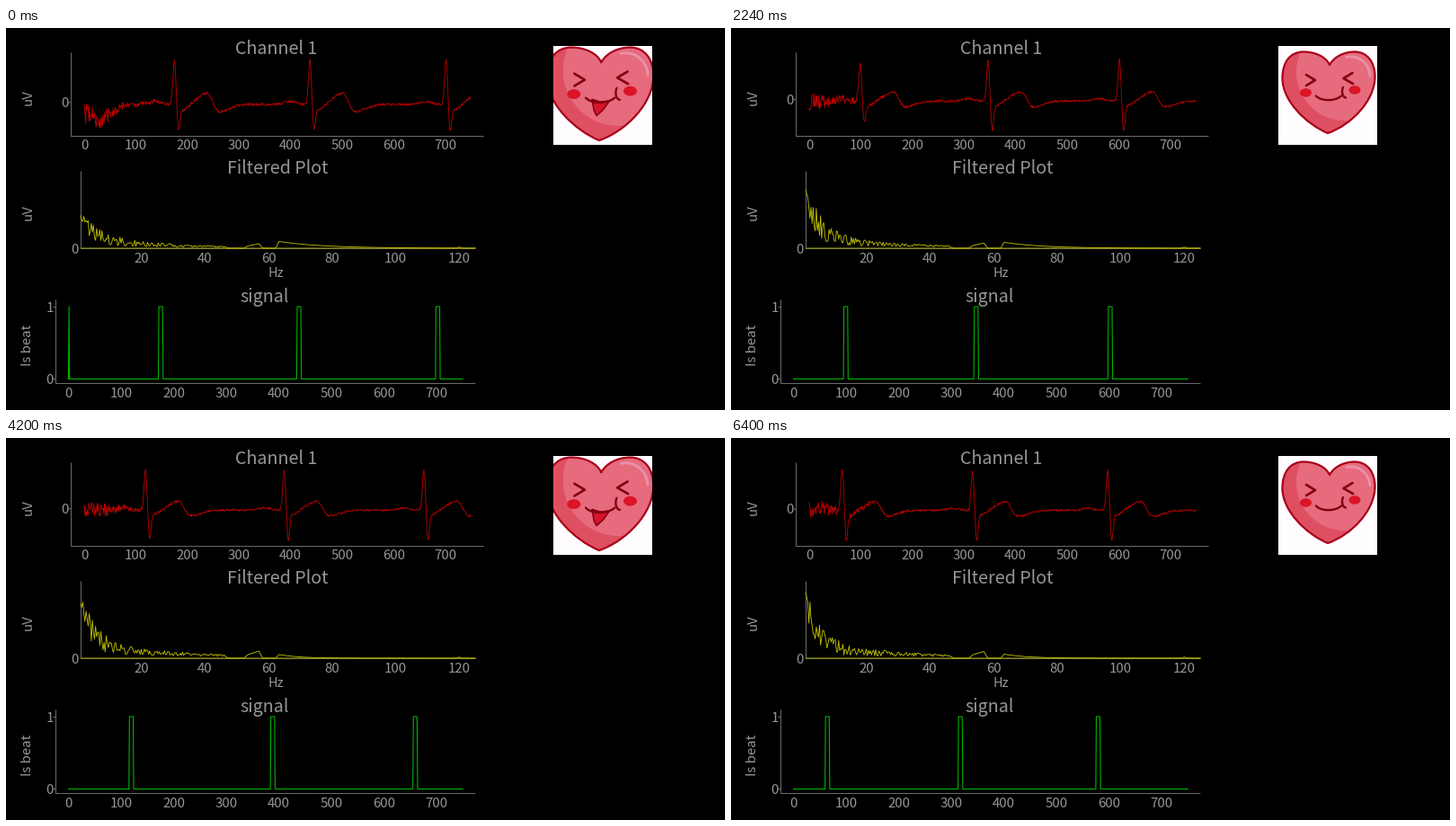
A matplotlib script for the animation above (6.44 s loop, 800 by 425 pixels).

```python
import numpy as np
import matplotlib.pyplot as plt
from matplotlib.animation import FuncAnimation
from matplotlib.patches import Circle, Ellipse, PathPatch, Polygon
from matplotlib.path import Path
from matplotlib.transforms import Affine2D

W, H, DPI = 800, 425, 100
STEP, FRAMES = 40, 161
PX = 72 / DPI  # points per pixel
GREY, AXIS = "#969696", "#6a6a6a"
plt.rcParams["font.family"] = "Noto Sans CJK JP"

rng = np.random.default_rng(7)
fig = plt.figure(figsize=(W / DPI, H / DPI), dpi=DPI, facecolor="black")
ax = fig.add_axes([0, 0, 1, 1])
ax.set(xlim=(0, W), ylim=(H, 0))
ax.axis("off")


def baseline(y, size=15):
    return y + 0.367 * size


def label(x, y, s, size=15, ha="center"):
    return ax.text(x, baseline(y, size), s, size=size * PX, color=GREY,
                   ha=ha, va="baseline")


def side_label(y, s):
    ax.text(24.5, y, s, size=15 * PX, color=GREY, rotation=90,
            ha="center", va="center")


def line(xs, ys, color=AXIS, w=1.0):
    return ax.plot(xs, ys, color=color, lw=w * PX, snap=False)[0]


def plot_frame(left, top, right, bottom):
    line([left, left, right], [top, bottom, bottom])


def x_labels(x0, per_unit, values, y):
    for v in values:
        label(x0 + per_unit * v, y, str(v))


# Static plot furniture
label(301, 22, "Channel 1", 19.7)
label(302.5, 155, "Filtered Plot", 19.7)
label(288, 298, "signal", 19.7)
label(300, 271.5, "Hz", 14.5)
side_label(77, "uV")
side_label(205, "uV")
side_label(353, "Is beat")
plot_frame(72.5, 28, 531, 120.5)
plot_frame(83.5, 160, 522, 245.5)
plot_frame(55.5, 303, 522, 395.5)
x_labels(87, 0.5736, range(0, 800, 100), 129.5)
x_labels(79.6, 3.54, range(20, 140, 20), 255)
x_labels(69.5, 0.585, range(0, 800, 100), 405.5)
label(80.5, 245.5, "0", ha="right")
for y, s in ((310.5, "1"), (390.5, "0")):
    label(53, y, s, ha="right")
    line([53, 55.5], [y, y])

# Recording: window start over time, and beat positions, both in samples
KEY_T = [0, 1240, 2240, 3480, 4200, 5440, 6400]
KEY_START = [0, 362, 603, 904, 1086, 1446, 1681]
BEATS = np.array([-88, 175, 438, 702, 950, 1205, 1474, 1745, 1998, 2260])
GROWTH = 0.5 + 0.5 * np.tanh((BEATS - 830) / 100)  # later beats are stronger
R_AMP = 46 + 6 * GROWTH
S_AMP = 30 + 13 * GROWTH
HISS = rng.uniform(-2.2, 2.2, 2600)
N = np.arange(751)


def bump(x, centre, left, right):
    d = x - centre
    return np.exp(-0.5 * (d / np.where(d < 0, left, right)) ** 2)


def ecg(start, settling, i):
    n = start + N
    v = HISS[n] * (0.6 + 0.4 * np.exp(-N / 250)) - 2
    for b, r, s in zip(BEATS, R_AMP, S_AMP):
        d = n - b
        boost = 1 + 0.15 * bump(b - start, 25, 8, 8)
        v += (r + 2) * boost * bump(d, 0, 2.9, 2.7)
        v -= (s - 5) * boost * bump(d, 8, 2.6, 2.6)
        v -= 6 * bump(d, 17, 7, 9)
        v += 3 * bump(d, -38, 12, 10)
        v += 12 * bump(d, 64, 17, 9)
        v -= 8 * bump(d, 86, 8, 20)
    # filter ringing at the left edge of the window
    ring = np.random.default_rng(100 + i).uniform(-1, 1, N.size)
    v += ring * 11 * np.exp(-(N / 75) ** 1.5)
    return v - 15 * settling * bump(N, 25, 10, 26)


def pulses(start, settling):
    n = start + N
    offset = n[:, None] - BEATS
    beat = ((offset >= -3) & (offset <= 4)).any(axis=1).astype(float)
    if settling > 0.7:
        beat[1] = 1
    return beat


# Spectrum: slowly changing roughness on a falling envelope
HZ = np.arange(1, 125.1, 1 / 3)
ROUGH = rng.uniform(-1, 1, (FRAMES // 8 + 3, HZ.size))
DEPTH = 0.95 * (1 - np.exp(-HZ / 6)) * np.exp(-HZ / 55)


def spectrum(t, i):
    k, u = divmod(i / 8, 1)
    rough = (1 - u) * ROUGH[int(k)] + u * ROUGH[int(k) + 1]
    sway = 0.5 - 0.5 * np.cos(2 * np.pi * t / 2700)
    low = 54 - 30 * np.exp(-t / 1300)
    v = low * np.exp(-(HZ - 1) / 4) + 11 * np.exp(-HZ / (24 + 14 * sway))
    v *= (1 + DEPTH * rough) * np.clip((47.5 - HZ) / 1.5, 0, 1)
    v += (5 + 3 * sway) * np.interp(HZ, [52.3, 53.5, 57, 58.2], [0, 0.5, 1, 0])
    tail = np.exp(-np.maximum(HZ - 63.3, 0) / (14 - 8 * sway))
    v += (7.5 - 3.5 * sway) * tail * np.clip(HZ - 62.3, 0, 1)
    return v + 1.2 * bump(HZ, 120, 0.4, 0.4)


zero = label(70, 83, "0", ha="right")
zero_tick = line([70, 72.5], [83, 83])
thousand = label(70, 31, "1000", ha="right")
thousand_tick = line([70, 72.5], [31, 31])
red = line([], [], "#bc0000", 0.85)
line([83.5, 522], [245, 245], "#a0a000")
yellow = line([], [], "#c4c400", 0.85)
green = line([], [], "#00b400", 1.1)

# Heart picture
hax = fig.add_axes([609 / W, 1 - 130 / H, 110 / W, 110 / H])
hax.set(xlim=(609, 719), ylim=(130, 20), xticks=[], yticks=[],
        facecolor="#fffcff")
hax.spines[:].set_visible(False)
DARK = "#860010"


def curve(*pts):
    return Path(pts, [Path.MOVETO] + [Path.CURVE4] * (len(pts) - 1))


OUTLINE = curve((666, 41), (662, 32), (650, 26.5), (637, 26.5),
                (622, 26.5), (613.5, 38), (613.5, 56),
                (613.5, 81), (640, 107), (664, 117),
                (690, 108), (716.5, 81), (716.5, 54),
                (716.5, 38), (708, 26.5), (694, 26.5),
                (682, 26.5), (671, 32), (666, 41))


def heart(tr, laughing):
    parts = []

    def add(patch, clip=None):
        patch.set_transform(tr + hax.transData)
        hax.add_patch(patch)
        if clip is not None:
            patch.set_clip_path(clip)
        parts.append(patch)
        return patch

    def stroke(path, color=DARK, w=2.4):
        add(PathPatch(path, fc="none", ec=color, lw=w * PX,
                      capstyle="round", joinstyle="round"))

    body = add(PathPatch(OUTLINE, fc="#df4f62", ec="none"))
    add(Circle((683, 49), 54, fc="#e66b7d", ec="none"), body)
    stroke(curve((685, 32.5), (697, 29.5), (710, 38), (711, 53)), "#ea90a8", 3)
    stroke(OUTLINE, "#a80018", 2.2)
    for x, y in ((639.5, 72), (694, 69)):
        add(Ellipse((x, y), 13, 9.5, fc="#dc1428", ec="none"))
    if laughing:
        add(Polygon([(657, 77), (665, 79.5), (674, 78.5), (668, 87),
                     (661.5, 93), (659, 88)], fc="#d8142a", ec=DARK,
                    lw=1.6 * PX, joinstyle="round"))
    stroke(Path([(640, 52), (650, 58), (640, 64)]), w=2.7)
    stroke(Path([(691.5, 50), (681.5, 56), (692, 62)]), w=2.7)
    stroke(curve((651, 75.5), (656, 81.5), (672, 82), (679, 75.5)))
    stroke(curve((681, 66), (679, 70), (680, 77), (684, 77.5)))
    return parts


calm = heart(Affine2D(), False)
joyful = heart(Affine2D().scale(1.15, 1.143).translate(-103.6, -8.7), True)


def show(parts, on):
    for part in parts:
        part.set_visible(on)


def move_tick(text, tick, y):
    text.set_y(baseline(y))
    tick.set_ydata([y, y])


def draw(i):
    t = i * STEP
    start = int(round(np.interp(t, KEY_T, KEY_START)))
    # the filter starts badly when the window opens on a falling T wave
    settling = bump(start - BEATS, 87, 8, 8).max()

    v = ecg(start, settling, i)
    gain = 79.5 / (v.max() - v.min())
    y0 = 34.7 + v.max() * gain
    y1000 = y0 - 66 * gain
    red.set_data(87 + 0.5736 * N, y0 - gain * v)
    move_tick(zero, zero_tick, y0)
    move_tick(thousand, thousand_tick, y1000)
    show((thousand, thousand_tick), y1000 >= 28)

    yellow.set_data(79.6 + 3.54 * HZ, 245 - spectrum(t, i))
    green.set_data(69.5 + 0.585 * N, 390.5 - 80.5 * pulses(start, settling))

    # a fresh beat makes the heart swell
    pos = BEATS - start
    excited = bool(np.any((pos > 628) & (pos < 746)))
    show(calm, not excited)
    show(joyful, excited)
    return []


anim = FuncAnimation(fig, draw, frames=FRAMES, init_func=lambda: draw(0),
                     interval=STEP, repeat=True, repeat_delay=0, blit=False)
plt.show()
```
